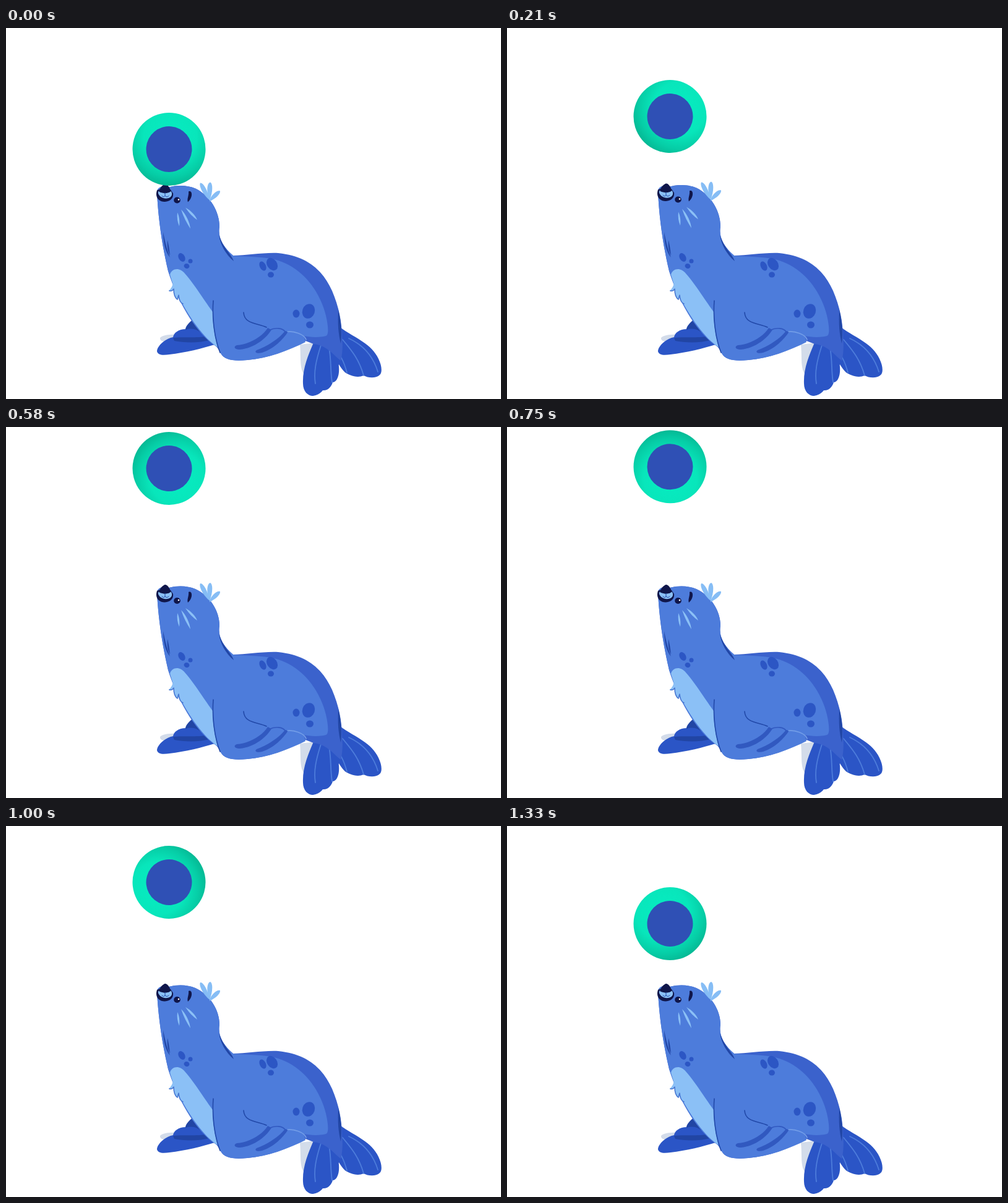
These frames come from a looping animation (800 px wide and 600 px high, 1370 ms). An HTML page:

```html
<!DOCTYPE html>
<html lang="en">
<head>
<meta charset="utf-8">
<title>Seal with a ball</title>
<style>
html, body { margin: 0; width: 100%; height: 100%; overflow: hidden; background: #fff; }
svg { display: block; width: 100vw; height: 100vh; }
.line { fill: none; stroke-linecap: round; stroke-linejoin: round; }
</style>
</head>
<body>
<svg viewBox="0 0 800 600">
  <defs>
    <radialGradient id="shade" gradientUnits="userSpaceOnUse" cx="-20" cy="0" r="86">
      <stop offset="0" stop-color="#06edc2"/>
      <stop offset=".5" stop-color="#08e6bb"/>
      <stop offset=".76" stop-color="#06cda6"/>
      <stop offset="1" stop-color="#04ae8b"/>
    </radialGradient>
  </defs>

  <!-- ground shadows -->
  <g fill="#d3dcea">
    <path d="M249 501C254 496 266 495 275 496L266 507C258 509 248 507 249 501Z"/>
    <path d="M475 512L500 509L481 559C474 549 477 529 475 512Z"/>
  </g>

  <!-- far front flipper -->
  <path fill="#2b55c6" d="M303 472C295 477 291 482 290 487C279 487 271 493 270 500C258 502 244 514 244 523C246 530 255 529 264 528C290 525 318 518 337 512L318 478Z"/>
  <g fill="#2145a4">
    <path d="M300 473C294 478 290 484 290 488C300 485 308 487 314 492L321 486L306 472Z"/>
    <path d="M270 501C282 499 310 502 328 498L332 504C312 510 288 509 272 506Z"/>
  </g>

  <!-- hind flippers -->
  <g fill="#2b55c6">
    <path d="M540 484C559 499 590 509 602 535C608 547 608 558 604 561C598 567 585 566 578 562C567 567 554 561 548 557C542 552 537 541 532 536Z"/>
    <path d="M497 509C488 530 479 551 480 575C480 588 488 595 496 595C504 594 509 590 512 586C520 587 526 580 528 573C536 572 539 560 538 548C537 541 540 536 542 532L524 508Z"/>
  </g>
  <g class="line" stroke="#4d7cdb" stroke-width="1.8">
    <path d="M544 504C560 523 571 537 578 562M554 502C576 512 593 530 601 556M538 527C547 540 548 548 551 557"/>
    <path d="M509 513C501 538 497 556 500 575M522 517C526 537 524 556 527 573"/>
  </g>

  <path id="back" fill="#3b62cc"/>
  <path id="body" fill="#4d7cdb"/>

  <!-- belly and chest tuft -->
  <path fill="#8bc0f6" d="M265 399C268 388 281 387 289 397C305 415 324 446 334 459C334 482 338 500 342 516C318 501 288 458 269 412Z"/>
  <path fill="#8bc0f6" d="M270 409C270 417 267 421 263 425Q268 426 271 423Q271 435 277 439L279 434Q280 444 287 447L286 425Z"/>
  <path class="line" stroke="#4676d2" stroke-width="1.6" d="M264 425Q269 426 271 422Q271 435 277 439L279 432Q280 444 286 446"/>

  <!-- near front flipper -->
  <g fill="#3159c0">
    <path d="M423 485C415 499 392 512 373 513C367 515 369 520 378 520C400 518 420 503 429 488Z"/>
    <path d="M451 490C440 504 421 515 405 521C400 525 407 527 414 525C432 519 447 505 456 491Z"/>
  </g>
  <g class="line" stroke="#2148a8" stroke-width="1.6">
    <path d="M384 460C385 479 406 477 421 484M335 441C333 466 336 500 346 525"/>
    <path d="M425 489C435 484 447 485 451 491" stroke="#3159c0"/>
    <path d="M455 491C465 490 482 495 485 504" stroke="#739ee8"/>
  </g>

  <!-- neck and rump creases -->
  <g fill="#2146a6">
    <path d="M254 330C254 348 258 363 265 371C260 358 257 346 254 330Z"/>
    <path d="M261 343C260 355 262 362 265 368C264 358 263 351 261 343Z"/>
    <path d="M344 334C346 350 355 366 368 377C365 366 351 357 344 334Z"/>
    <path d="M537 456C536 478 537 495 541 510C543 494 542 475 537 456Z"/>
  </g>
  <g id="spots" fill="#2c56c4"></g>

  <g id="face">
    <g fill="#86bdf5">
      <path d="M329 281C319 273 311 258 314 253C319 252 327 267 329 281Z"/>
      <path d="M329 281C323 267 325 253 330 252C335 254 334 270 329 281Z"/>
      <path d="M329 281C332 272 341 264 346 266C347 271 338 279 329 283Z"/>
    </g>
    <path fill="#10164a" d="M244 265C240 277 248 284 257 283.500C266 283 271 277 270 270L266 264L252 262Z"/>
    <path fill="#8bc0f6" d="M246 270C245 263 253 266 257 266C264 264 269 266 268 272C267 280 250 281 246 270Z"/>
    <path fill="#10164a" d="M247 267C249 260 254 255 258 255C262 256 266 263 266 267C260 271 252 270 247 267Z"/>
    <path class="line" stroke="#2146a6" stroke-width="1" d="M257 269V274M252 274Q255 277 257 274Q260 277 263 274"/>
    <ellipse cx="276.500" cy="281" rx="5.300" ry="5" fill="#10164a"/>
    <circle cx="279" cy="280" r="1.300" fill="#fff"/>
    <path fill="#10164a" d="M295 267C301 264 303 276 294 284C292 279 296 273 295 267Z"/>
    <g fill="#8bc0f6">
      <path d="M277 301C276 309 277 316 280 323C281 315 280 307 277 301Z"/>
      <path d="M283 296C287 308 292 318 298 327C297 317 291 304 283 296Z"/>
      <path d="M290 293C297 303 302 308 309 313C306 305 299 298 290 293Z"/>
    </g>
  </g>

  <g id="ball">
    <circle r="59" fill="url(#shade)"/>
    <circle r="37" fill="#2f50b5"/>
  </g>
</svg>
<script>
const LOOP = 1370;
const $ = id => document.getElementById(id);

// keys: frame index at 24 fps, value
const height = [[0, 196], [5, 143], [10, 87.5], [14, 67], [17, 63.5], [21, 72], [27, 114], [32, 158]];
const turn = [[0, 95], [5, 140], [10, 190], [14, 232], [21, 298], [27, 365], [32, 416]];
const nod = [[0, -2.5], [3, -4.5], [5, -3.5], [8, -0.6], [10, 0], [32, 0]];

// cubic curve through the keys
function curve(keys, x) {
  const last = keys.length - 1;
  let k = 0;
  while (k < last - 1 && x >= keys[k + 1][0]) k++;
  const slope = n => {
    const a = keys[Math.max(0, n - 1)], b = keys[Math.min(last, n + 1)];
    return (b[1] - a[1]) / (b[0] - a[0]);
  };
  const [x0, y0] = keys[k], [x1, y1] = keys[k + 1];
  const w = x1 - x0, u = (x - x0) / w, v = 1 - u;
  return y0 * v * v * (1 + 2 * u) + y1 * u * u * (3 - 2 * u)
    + w * u * v * (v * slope(k) - u * slope(k + 1));
}

// head and neck outline, raised by h at the top
const head = h => `M262 393C253 355 246 310 244 ${268 + h}C244 ${260 + h} 254 ${257 + h} 263 ${260 + h}` +
  `C278 ${256 + h} 294 ${257 + h} 306 ${262 + h}C330 ${273 + h * 0.8} 345 ${298 + h * 0.4} 345 321` +
  `C342 339 350 353 367 368`;
const belly = 'C455 522 425 534 390 537C367 539 353 537 347 526C343 518 340 514 335 512C306 490 278 444 262 393Z';

const backPath = h => head(h) + 'C390 368 414 363 440 364C486 369 511 390 527 425' +
  'C538 451 543 476 543 500C545 516 543 532 541 538C530 530 519 513 497 511L484 506' + belly;
const bodyPath = h => head(h) + 'C395 371 418 369 440 376C480 389 507 425 517 465' +
  'C521 483 522 496 517 498C506 501 491 500 481 498L484 508' + belly;

const spots = [
  [284, 371, 5, 7.5, -30], [298, 377, 3.5, 3.5, 0], [292, 385, 4.5, 4, 20],
  [415, 385, 5, 8, -25], [430, 382, 8, 11, -35], [428, 399, 5, 4.5, 0],
  [489, 458, 10, 12, 18], [469, 462, 5.5, 6.5, 0], [491, 480, 6, 5.5, 0]
];
$('spots').innerHTML = spots.map(([x, y, rx, ry, a]) =>
  `<ellipse rx="${rx}" ry="${ry}" transform="translate(${x} ${y}) rotate(${a})"/>`).join('');

function draw(ms) {
  const tick = Math.floor((ms % LOOP) / 10);
  const i = Math.ceil((tick + 0.5) * 0.24) - 1;
  const h = curve(nod, i);
  $('back').setAttribute('d', backPath(h));
  $('body').setAttribute('d', bodyPath(h));
  $('face').setAttribute('transform', `translate(0 ${h})`);
  $('ball').setAttribute('transform', `translate(263.5 ${curve(height, i)}) rotate(${curve(turn, i)})`);
}

const start = performance.now();
function run() {
  draw(performance.now() - start);
  requestAnimationFrame(run);
}
run();
</script>
</body>
</html>
```
